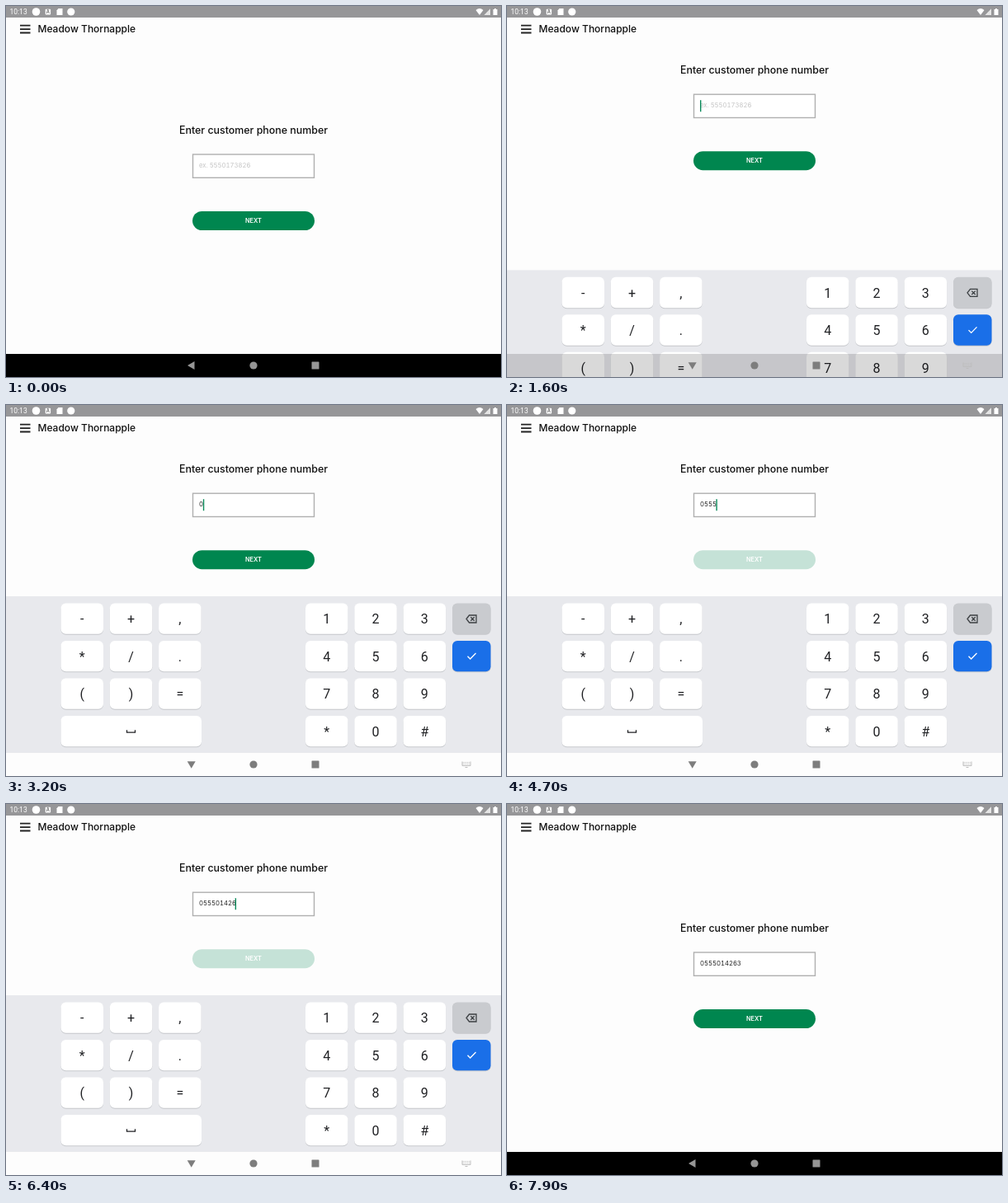
Write an HTML page that moves like this. It is 600 px wide and 450 px high and loops after 8 s.

```html
<!DOCTYPE html>
<html lang="en">
<head>
<meta charset="utf-8">
<style>
html, body { margin: 0; width: 100%; height: 100%; overflow: hidden; background: #fdfdfd; }
svg { display: block; width: 600px; height: 450px; }
text { font-family: Inter, sans-serif; }
.head { font-weight: 500; fill: #111; }
.digits { font-size: 7.7px; font-variant-numeric: tabular-nums; }
.sys { font-family: Roboto, sans-serif; }
.key { font-size: 16px; fill: #202124; text-anchor: middle; }
.line { fill: none; stroke-width: 1.3; }
</style>
</head>
<body>
<svg viewBox="0 0 600 450">
  <rect width="600" height="450" fill="#fdfdfd"/>
  <path d="M17 23.7H29.5M17 28.1H29.5M17 32.5H29.5" stroke="#222" stroke-width="1.8"/>
  <text class="head" x="38.5" y="31.8" font-size="12">Meadow Thornapple</text>

  <g id="form">
    <text class="head" x="300" y="155" font-size="12.4" text-anchor="middle">Enter customer phone number</text>
    <rect x="226.5" y="180" width="147" height="28.3" fill="#fff" stroke="#b0b0b0" stroke-width="1.4"/>
    <text id="hint" class="digits" x="234" y="195.7" fill="#c4c4c4">ex. 5550173826</text>
    <text id="value" class="digits" x="234" y="195.7" fill="#222"></text>
    <rect id="caret" y="187" width="1.4" height="14" fill="#0a8a5a"/>
    <rect id="button" x="226" y="249" width="148" height="23" rx="11.5"/>
    <text x="300" y="263.2" font-size="7.4" font-weight="600" fill="#fff" text-anchor="middle">NEXT</text>
  </g>

  <g id="keyboard">
    <rect y="232" width="600" height="190" fill="#e8e9ed"/>
    <g id="keys"></g>
    <path class="line" stroke="#3c4043" d="M558 259.5L561.5 255H570V264H561.5ZM563.3 257.3L567.7 261.7M567.7 257.3L563.3 261.7"/>
    <path class="line" stroke="#fff" d="M559.5 304.8L562.7 308L569.5 301"/>
    <path class="line" stroke="#202124" d="M146.5 394.3V397.2H156.5V394.3"/>
  </g>

  <rect id="nav" y="422" width="600" height="28"/>
  <g id="icons">
    <path id="back" d="M220 436L228.5 431V441Z"/>
    <circle cx="300" cy="436" r="4.6"/>
    <rect x="370.5" y="431.5" width="9" height="9" rx="0.6"/>
  </g>
  <g id="switcher" stroke="#bdbdbd" fill="none">
    <path stroke-dasharray="1 .8" d="M553.5 433.5H562.5M553.5 435.5H562.5"/>
    <path d="M553 432.5V437.5H563V432.5M556.5 439.5H559.5"/>
  </g>

  <rect width="600" height="14" fill="#969698"/>
  <g fill="#fff">
    <text class="sys" x="4.5" y="10.2" font-size="8.5">10:13</text>
    <circle cx="36.5" cy="7" r="4.8"/>
    <rect x="47.7" y="3.8" width="6.4" height="6.8" rx="0.8"/>
    <path d="M61.5 5.3L63.5 3H68.5V11H61.5Z"/>
    <circle cx="78.8" cy="7" r="4.6"/>
    <path d="M569.5 5Q574 1.2 578.5 5L574 11Z"/>
    <path d="M579.5 11L587 3.2V11Z" opacity=".75"/>
    <path d="M590.5 4H592V3H594V4H595.5V11H590.5Z"/>
    <text x="50.9" y="9.2" font-size="5.5" font-weight="700" text-anchor="middle" fill="#777">A</text>
  </g>
</svg>
<script>
const LOOP = 8000;
const FOCUS = 1500, BLUR = 7100;
const PHONE = "0555014263";
const TYPED_AT = [3100, 3500, 3800, 4200, 4800, 5200, 5500, 5800, 6300, 6700];
const DIGIT_WIDTH = 4.85;
// [time, value] points joined by straight segments
const SLIDE = [[1500, 190], [1600, 89], [1700, 25], [1800, 0], [7100, 0], [7200, 68], [7300, 150], [7400, 190]];
const SHADE = [[1400, 1], [1500, .5], [1600, .15], [1800, 0], [7100, 0], [7300, .42], [7500, 1]];
const TURN = [[1400, 0], [1600, -90], [7100, -90], [7300, 0]];
const ICON_GREY = [[1400, 150], [1600, 125], [7100, 125], [7300, 175], [7500, 150]];

const el = id => document.getElementById(id);
const set = (id, attrs) => {
  for (const name in attrs) el(id).setAttribute(name, attrs[name]);
};

function track(points, t) {
  const i = points.findIndex(p => p[0] > t);
  if (i === 0) return points[0][1];
  if (i < 0) return points[points.length - 1][1];
  const [t0, a] = points[i - 1], [t1, b] = points[i];
  return a + (b - a) * (t - t0) / (t1 - t0);
}

function key(x, row, label = "", width = 51.5, fill = "#fff") {
  const y = 240.5 + row * 45.5;
  const box = (dy, color) => `<rect x="${x}" y="${y + dy}" width="${width}" height="37.3" rx="6" fill="${color}"/>`;
  return box(1, "#c6c8cc") + box(0, fill) +
    `<text class="sys key" x="${x + width / 2}" y="${y + 24.7}">${label}</text>`;
}

function pad(rows, left) {
  return rows.map((row, r) => [...row].map((c, i) => key(left + i * 59.3, r, c)).join("")).join("");
}

el("keys").innerHTML = pad(["-+,", "*/.", "()="], 66.5) + key(66.5, 3, "", 170.5) +
  pad(["123", "456", "789", "*0#"], 363) +
  key(541, 0, "", 46.5, "#c9cbcf") + key(541, 1, "", 46.5, "#1a6fe8");

function draw(t) {
  const focused = t >= FOCUS && t < BLUR;
  const count = TYPED_AT.filter(at => at <= t).length;
  const caretOn = focused && (count > 0 || (t - FOCUS) % 1000 < 500);
  const slide = track(SLIDE, t);
  const grey = track(ICON_GREY, t);

  set("form", { transform: `translate(0 ${focused ? -72.8 : 0})` });
  set("hint", { opacity: count ? 0 : 1 });
  el("value").textContent = PHONE.slice(0, count);
  set("caret", { x: 234 + count * DIGIT_WIDTH, opacity: caretOn ? 1 : 0 });
  set("button", { fill: t >= 3300 && t < BLUR ? "#c5e2d7" : "#00864f" });
  set("keyboard", { transform: `translate(0 ${slide})`, opacity: slide < 190 ? 1 : 0 });
  set("nav", { opacity: track(SHADE, t) });
  set("icons", { fill: `rgb(${grey},${grey},${grey})` });
  set("back", { transform: `rotate(${track(TURN, t)} 224.7 436)` });
  set("switcher", { opacity: t >= 1600 && t < BLUR ? 1 : 0 });
}

function frame() {
  draw(performance.now() % LOOP);
  requestAnimationFrame(frame);
}
frame();
</script>
</body>
</html>
```
